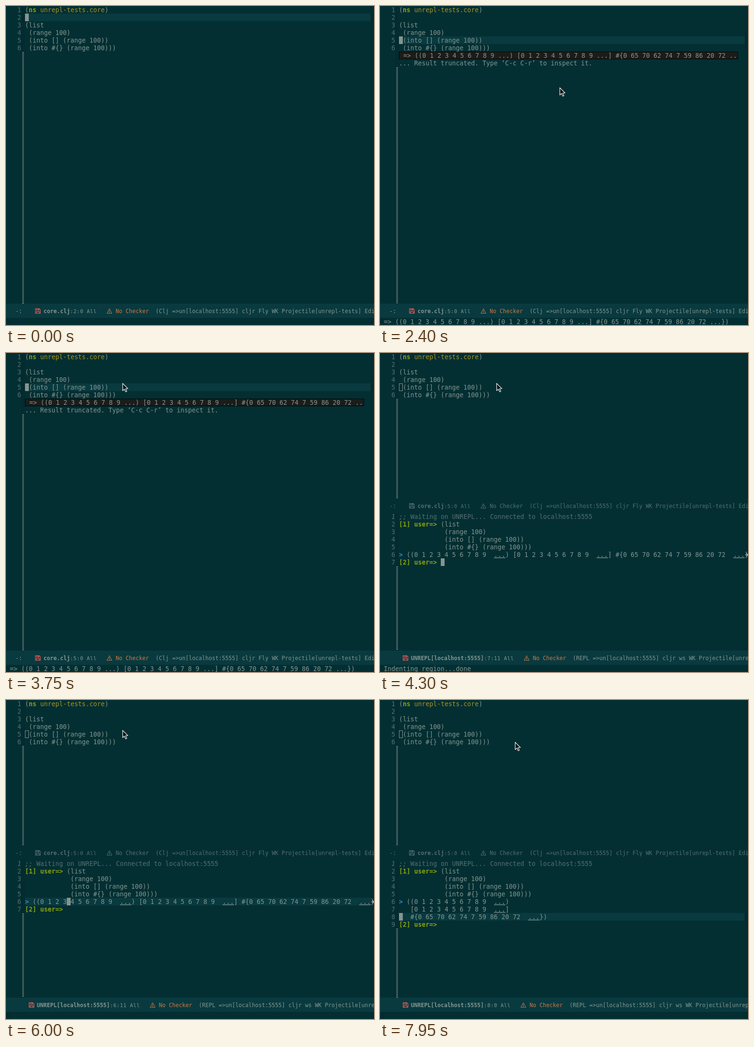
Write an HTML page that moves like this. It is 775 px wide and 671 px high and loops after 8000 ms.

```html
<!DOCTYPE html>
<html lang="en">
<head>
<meta charset="utf-8">
<title>Editor session</title>
<style>
  html, body { margin: 0; width: 100%; height: 100%; overflow: hidden; background: #032f33; }
  svg { display: block; width: 775px; height: 671px; }
  text { white-space: pre; font: 13.288px "DejaVu Sans Mono", monospace; }
  .mode { font-size: 11.627px; }
  .pos { font-size: 10.8px; letter-spacing: .5px; }
  .b { font-weight: bold; }
  .i { font-style: italic; }
  .u { text-decoration: underline; }
</style>
</head>
<body>
<svg id="stage" viewBox="0 0 775 671"></svg>
<script>
const LOOP = 8000, CELL = 8, ROW = 16, LEFT = 40, RIGHT = 768;
const C = {
  bg: '#032f33', fringe: '#032b30', bar: '#093a3f', text: '#84958f', dim: '#566e70',
  green: '#86a20d', yellow: '#ab9320', blue: '#2f8cc4', red: '#dc5a57', orange: '#cb7944',
  overlay: '#1c1c1a', dots: '#a3aca6'
};
const stage = document.getElementById('stage');

const esc = s => s.replace(/&/g, '&amp;').replace(/</g, '&lt;').replace(/>/g, '&gt;');
const rect = (x, y, w, h, fill, extra = '') =>
  `<rect x="${x}" y="${y}" width="${w}" height="${h}" fill="${fill}" ${extra}/>`;
const text = (x, y, s, fill = C.text, cls = '') =>
  `<text x="${x}" y="${y}" fill="${fill}" class="${cls}">${esc(s)}</text>`;

// A line is a list of [text, colour, class] runs.
const plain = s => [[s]];
const digits = '0 1 2 3 4 5 6 7 8 9';
const hashes = '0 65 70 62 74 7 59 86 20 72';
const more = ['...', C.text, 'u'];
const printed = `=> ((${digits} ...) [${digits} ...] #{${hashes} ..`;
const code = ['(list', ' (range 100)', ' (into [] (range 100))', ' (into #{} (range 100)))'];
const source = [
  [['('], ['ns', C.green, 'b'], [' '], ['unrepl-tests.core', C.yellow], [')']],
  [], ...code.map(plain)
];

function replLines(breaks) {
  const list = [['> ', C.blue, 'b'], [`((${digits}  `], more, [')']];
  const vector = [[`[${digits}  `], more, [']']];
  const set = [[`#{${hashes}  `], more, ['})']];
  const gap = [' '], indent = ['   '];
  const result = breaks === 0 ? [[...list, gap, ...vector, gap, ...set]]
    : breaks === 1 ? [list, [indent, ...vector, gap, ...set]]
    : [list, [indent, ...vector], [indent, ...set]];
  const prompt = n => [`[${n}] user=>`, C.green, 'b'];
  return [
    [[';;', C.dim, 'i'], [' Waiting on UNREPL... Connected to localhost:5555', C.dim]],
    [prompt(1), [' ' + code[0]]],
    ...code.slice(1).map(s => plain(' '.repeat(11) + s)),
    ...result,
    [prompt(2), [' ']]
  ];
}

function drawLine(runs, y) {
  let x = LEFT, out = '';
  for (const [s, fill, cls] of runs) {
    out += text(x, y + 13, s, fill, cls);
    x += s.length * CELL;
  }
  return out;
}

function buffer({ top, bottom, lines, row, col, active, highlight, extraRows = 0, italicFirst }) {
  const y = top + (row - 1) * ROW, x = LEFT + col * CELL;
  let out = rect(32, top, 8, bottom - top, C.fringe) + rect(RIGHT, top, 7, bottom - top, C.fringe);
  if (highlight) out += rect(LEFT, y, RIGHT - LEFT, ROW, C.bar);
  lines.forEach((line, i) => {
    const lineY = top + i * ROW;
    out += text(24, lineY + 13, String(i + 1), C.dim, italicFirst && i === 0 ? 'i' : '');
    out += drawLine(line, lineY);
  });
  if (active) {
    const under = lines[row - 1].map(run => run[0]).join('')[col] || ' ';
    out += rect(x, y, CELL, ROW, C.text) + text(x, y + 13, under, C.bg);
  } else {
    out += rect(x + .5, y + .5, CELL - 1, ROW - 1, 'none', `stroke="${C.text}"`);
  }
  const end = top + (lines.length + extraRows) * ROW;
  for (let d = end + 1; d < bottom; d += 3) out += rect(34, d, 4, 1, C.dots);
  return out;
}

const floppy = (x, y, c) => `<g transform="translate(${x} ${y})" fill="none" stroke="${c}" stroke-width="1.2">
  <path d="M.6 .6H8.4L10.9 3V10.4H.6Z"/><path d="M3 .6V4H8V.6M2.6 10.4V6.6H8.8V10.4"/>
  <path d="M6.4 1V3.4" stroke-width="1.6"/></g>`;
const warning = (x, y, c) => `<g transform="translate(${x} ${y})" fill="none" stroke="${c}">
  <path d="M5.8 .7L11 10.4H.6Z" stroke-linejoin="round"/><path d="M5.8 4V7.2M5.8 8V9.2" stroke-width="1.2"/></g>`;

function modeLine({ top, x, iconX, name, pos, modes, active, flag = '' }) {
  const main = active ? C.text : C.dim;
  const base = top + 20, after = x + (name.length + pos.length) * 7;
  return rect(0, top, 775, 30, active ? C.bar : C.bg)
    + text(20, base, flag, main, 'mode')
    + floppy(iconX, top + 10, active ? C.red : C.dim)
    + text(x, base, name, main, 'mode b')
    + text(x + name.length * 7, base, pos, main, 'mode pos')
    + warning(after + 21, top + 10, active ? C.orange : C.dim)
    + text(after + 40, base, 'No Checker', active ? C.orange : C.dim, 'mode')
    + text(after + 124, base, modes, main, 'mode');
}

// Last entry whose start time has passed.
const at = (steps, t) => steps.reduce((found, s) => t >= s[0] ? s : found);

const sourceRow = [[0, 2], [800, 3], [900, 4], [1000, 5]];
// start, row, column, line breaks inserted
const replCursor = [
  [4200, 7, 11, 0], [5350, 6, 11, 0], [6100, 6, 29, 0], [6600, 7, 3, 1], [6850, 7, 0, 1],
  [7150, 7, 29, 1], [7400, 8, 3, 2], [7500, 8, 0, 2]
];
const echoes = [
  [0, ''], [1600, 'C-c-'], [1650, ''], [1700, printed + '.})'],
  [4200, 'Indenting region...done'], [5350, '']
];
const pointerPaths = [
  { until: 6600, keys: [[1900, 390, 200], [2500, 375, 165], [3150, 346, 144], [3750, 245, 63]] },
  { until: LOOP, keys: [[7650, 245, 63], [7950, 284, 88]] }
];

function pointer(t) {
  const path = pointerPaths.find(p => t >= p.keys[0][0] && t < p.until);
  if (!path) return '';
  const i = path.keys.findIndex(k => k[0] > t);
  let [, x, y] = path.keys[path.keys.length - 1];
  if (i > 0) {
    const [a, b] = [path.keys[i - 1], path.keys[i]];
    const f = (t - a[0]) / (b[0] - a[0]);
    x = Math.round(a[1] + (b[1] - a[1]) * f);
    y = Math.round(a[2] + (b[2] - a[2]) * f);
  }
  return `<path transform="translate(${x} ${y})" d="M.7 .8V16.2L4.3 12.9L7 18.8L9.4 17.7L6.8 12H11.7Z"
    fill="#0a1213" stroke="#f4f6f5" stroke-width="1.2" stroke-linejoin="round"/>`;
}

function resultOverlay() {
  return rect(40.5, 96.5, 713, 15, C.overlay, 'stroke="#050505"')
    + text(49, 109, printed)
    + text(LEFT, 125, '... Result truncated. Type ‘C-c C-r’ to inspect it.');
}

function scene(t) {
  const split = t >= 4200, overlay = t >= 1700 && !split;
  const row = at(sourceRow, t)[1], sourceBottom = split ? 305 : 626;
  let out = rect(0, 0, 775, 671, C.bg) + buffer({
    top: 0, bottom: sourceBottom, lines: source, row, col: 0,
    active: !split, highlight: !split, extraRows: overlay ? 2 : 0
  });
  if (overlay) out += resultOverlay();
  out += modeLine({
    top: split ? 306 : 626, x: 79, iconX: 61.5, name: 'core.clj', pos: `:${row}:0 All`, flag: '-:',
    modes: '(Clj =>un[localhost:5555] cljr Fly WK Projectile[unrepl-tests] Editor', active: !split
  });
  if (split) {
    const [, line, col, breaks] = at(replCursor, t);
    out += buffer({
      top: 336, bottom: 626, lines: replLines(breaks), row: line, col,
      active: true, highlight: t >= 5350, italicFirst: true
    });
    if (!breaks) {
      out += `<path d="M769 424.5H774.5M771.5 421L775 424.5L771.5 428" fill="none" stroke="${C.dots}" stroke-width="1.5"/>`;
    }
    out += modeLine({
      top: 626, x: 65, iconX: 48, name: 'UNREPL[localhost:5555]', pos: `:${line}:${col} All`,
      modes: '(REPL =>un[localhost:5555] cljr ws WK Projectile[unrepl-tests]', active: true
    });
  }
  return out + rect(0, 656, 8, 15, C.fringe) + rect(RIGHT, 656, 7, 15, C.fringe)
    + text(8, 669, at(echoes, t)[1]) + pointer(t);
}

let shown = -1;
function frame(now) {
  const t = Math.floor(now % LOOP / 50) * 50;
  if (t !== shown) {
    stage.innerHTML = scene(t);
    shown = t;
  }
  requestAnimationFrame(frame);
}
frame(0);
</script>
</body>
</html>
```
